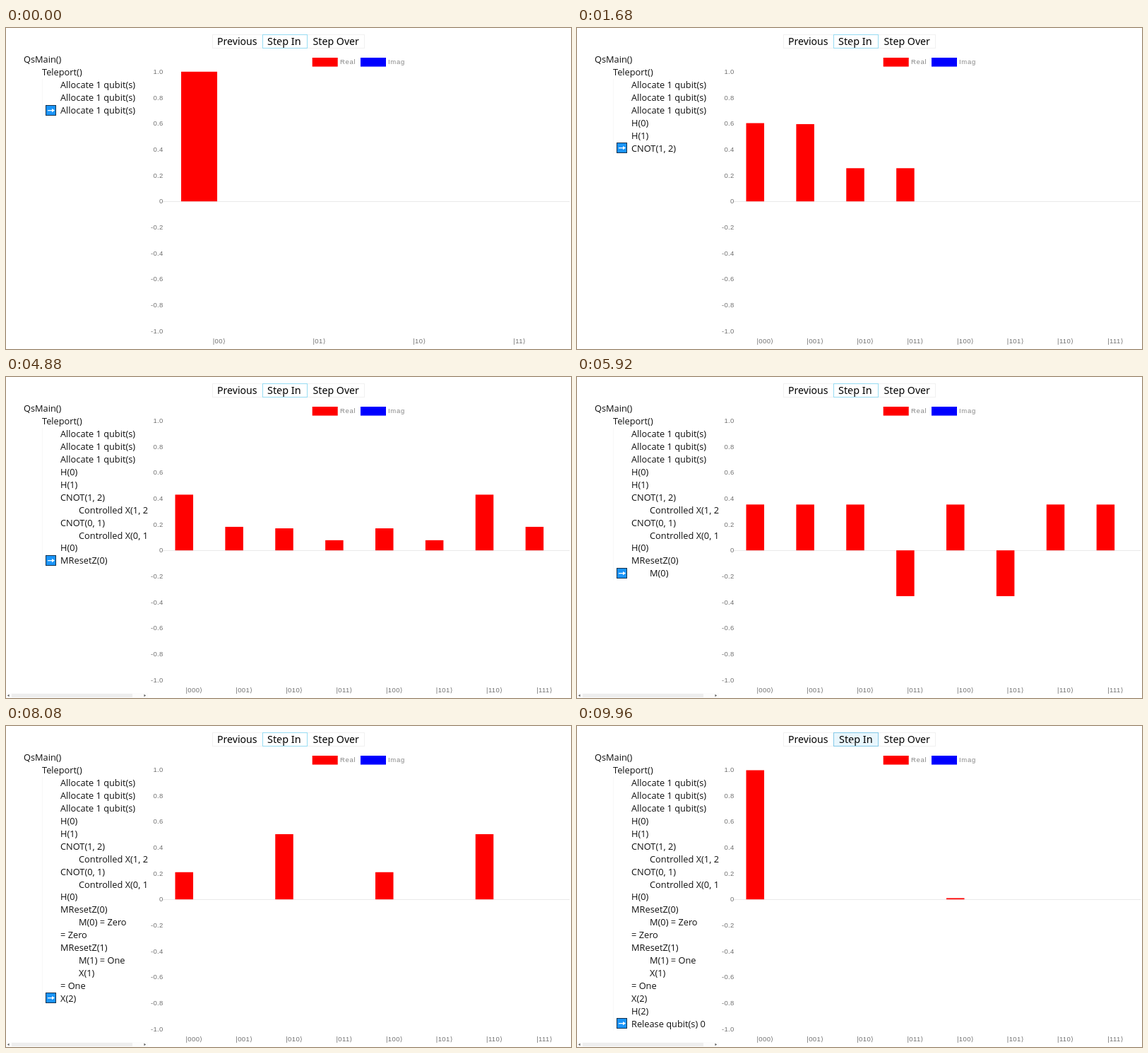
Write an HTML page with a canvas that moves like this. It is 800 by 454 pixels and loops after 10 s.

```html
<!DOCTYPE html>
<html lang="en">
<head>
<meta charset="utf-8">
<title>Quantum teleport stepper</title>
<style>
  html, body { margin: 0; width: 100%; height: 100%; overflow: hidden; background: #fff; }
  canvas { display: block; }
</style>
</head>
<body>
<canvas id="stage" width="800" height="454"></canvas>
<script>
const ctx = document.getElementById('stage').getContext('2d');
const LOOP = 10000, TWEEN = 1000, PRESS = 110;
const SANS = '"Open Sans", "Noto Sans", sans-serif';
const BUTTON = '"Noto Sans", "Open Sans", sans-serif';
const CHART = '"Liberation Sans", "DejaVu Sans", sans-serif';

// Call tree: [indent level, text]
const rows = [
  [0, 'QsMain()'], [1, 'Teleport()'],
  [2, 'Allocate 1 qubit(s)'], [2, 'Allocate 1 qubit(s)'], [2, 'Allocate 1 qubit(s)'],
  [2, 'H(0)'], [2, 'H(1)'], [2, 'CNOT(1, 2)'], [3, 'Controlled X(1, 2)'],
  [2, 'CNOT(0, 1)'], [3, 'Controlled X(0, 1)'], [2, 'H(0)'],
  [2, 'MResetZ(0)'], [3, 'M(0) = Zero'], [2, '= Zero'],
  [2, 'MResetZ(1)'], [3, 'M(1) = One'], [3, 'X(1)'], [2, '= One'],
  [2, 'X(2)'], [2, 'H(2)'], [2, 'Release qubit(s) 0']
];

// Gates on an eight-entry amplitude list; qubit 0 is the lowest bit
const bit = (i, q) => i >> q & 1;
const same = s => s;
const H = q => s => s.map((a, i) =>
  (s[i ^ 1 << q] + (bit(i, q) ? -a : a)) * Math.SQRT1_2);
const X = q => s => s.map((_, i) => s[i ^ 1 << q]);
const CNOT = (c, q) => s => s.map((a, i) => bit(i, c) ? s[i ^ 1 << q] : a);
const M = (q, v) => s => {
  const kept = s.map((a, i) => bit(i, q) === v ? a : 0);
  const norm = Math.hypot(...kept);
  return kept.map(a => a / norm);
};

// Clicks: [time, row under the arrow, operation just executed]
const clicks = [
  [230, 5, same], [870, 6, H(0)], [1517, 7, H(1)], [2160, 8, same],
  [2797, 9, CNOT(1, 2)], [3540, 10, same], [4190, 11, CNOT(0, 1)],
  [4730, 12, H(0)], [5380, 13, same], [6040, 15, M(0, 0)], [6840, 16, same],
  [7400, 17, M(1, 1)], [8001, 19, X(1)], [8650, 20, X(2)], [9302, 21, H(2)],
  [10030, 21, same]
];

const easeOutQuart = p => 1 - (1 - p) ** 4;

// Each click starts a new tween from whatever the chart shows then
function chartAt(t) {
  let state = [1, 0, 0, 0, 0, 0, 0, 0];
  let view = { amps: state, slot: 1 / 4 }, arrow = 4;
  clicks.forEach(([start, row, gate], n) => {
    if (start > t) return;
    const end = n + 1 < clicks.length ? Math.min(t, clicks[n + 1][0]) : t;
    const k = easeOutQuart(Math.min(1, (end - start) / TWEEN));
    state = gate(state);
    view = {
      amps: view.amps.map((a, i) => a + (state[i] - a) * k),
      slot: view.slot + (1 / 8 - view.slot) * k
    };
    arrow = row;
  });
  return { ...view, arrow };
}

function text(str, x, y, size, family, color, align = 'left', spacing = 0) {
  ctx.font = `${size}px ${family}`;
  ctx.fillStyle = color;
  ctx.textAlign = align;
  ctx.letterSpacing = spacing + 'px';
  ctx.fillText(str, x, y);
}

function rect(x, y, w, h, color) {
  ctx.fillStyle = color;
  ctx.fillRect(x, y, w, h);
}

function box(x, y, w, h, fill, line) {
  rect(x, y, w, h, line);
  rect(x + 1, y + 1, w - 2, h - 2, fill);
}

function drawButtons(pressed) {
  box(292, 9, 72, 20, '#fff', '#f1f1f1');
  box(426, 9, 82, 20, '#fff', '#f1f1f1');
  box(363, 9, 64, 20, pressed ? '#e8f6fd' : '#fff', pressed ? '#84c9e8' : '#98dcf2');
  text('Previous', 299, 24, 14.1, BUTTON, '#000');
  text('Step In', pressed ? 371 : 370, 24, 14.4, BUTTON, '#000');
  text('Step Over', 434.5, 24, 14.2, BUTTON, '#000');
  const pointer = new Path2D('M388.5 19v6l1.5-1.3 2.5-.2z');
  ctx.fillStyle = '#fff';
  ctx.strokeStyle = '#777';
  ctx.lineWidth = .6;
  ctx.stroke(pointer);
  ctx.fill(pointer);
}

function drawTree(arrow) {
  ctx.save();
  ctx.beginPath();
  ctx.rect(0, 0, 201, 454);
  ctx.clip();
  rect(51, 72, 1, (arrow - 1) * 17.93, '#f8f8f8');
  // A measurement has no result until its own step is done
  rows.slice(0, arrow + 1).forEach(([level, label], i) =>
    text(i === arrow ? label.split(' = ')[0] : label,
      25 + level * 26, 49.2 + i * 17.93, 12.8, SANS, '#111'));
  ctx.restore();

  const y = Math.round(44.8 + arrow * 17.93);
  box(56, y - 8, 15, 15, '#1a94f8', '#12304d');
  rect(59, y - 1, 7, 1.3, '#fff');
  ctx.fill(new Path2D(`M65 ${y - 3}l4 2.6-4 2.6z`));

  if (arrow >= 8) {
    rect(0, 447, 201, 7, '#fcfcfc');
    rect(8, 448, 171, 5, '#eee');
    ctx.fillStyle = '#555';
    ctx.fill(new Path2D('M2 450.5l2.5-1.8v3.6zM198 450.5l-2.5-1.8v3.6z'));
  }
}

function drawChart({ amps, slot, arrow }) {
  const left = 231, width = 567, zero = 245.2, unit = 183.4;
  rect(433.7, 42, 36, 12.6, '#f00');
  rect(502, 42, 36, 12.6, '#00f');
  text('Real', 473, 51.2, 9.5, CHART, '#888', 'left', .7);
  text('Imag', 541, 51.2, 9.5, CHART, '#888', 'left', .7);

  for (let n = 5; n >= -5; n--)
    text(n ? (n / 5).toFixed(1) : '0', 222.5, zero - n * unit / 5 + 3.2, 9.5, CHART, '#707070', 'right', .3);
  rect(222, 245, 576, 1, '#e9e9e9');

  const bits = arrow > 4 ? 3 : 2, count = 1 << bits;
  for (let i = 0; i < count; i++)
    text(`|${i.toString(2).padStart(bits, '0')}⟩`, left + (i + .5) * width / count,
      446, 9.5, CHART, '#707070', 'center', .4);

  const cell = width * slot;
  amps.forEach((a, i) => {
    if (Math.abs(a) > .001)
      rect(left + cell * (i + .12), zero - a * unit, cell * .36, a * unit, '#f00');
  });
}

function frame(now) {
  const t = now % LOOP;
  const chart = chartAt(t);
  rect(0, 0, 800, 454, '#fff');
  drawButtons(clicks.some(([at]) => t >= at - PRESS && t < at));
  drawTree(chart.arrow);
  drawChart(chart);
}

const begin = performance.now();
function tick() {
  frame(performance.now() - begin);
  requestAnimationFrame(tick);
}
tick();
</script>
</body>
</html>
```
